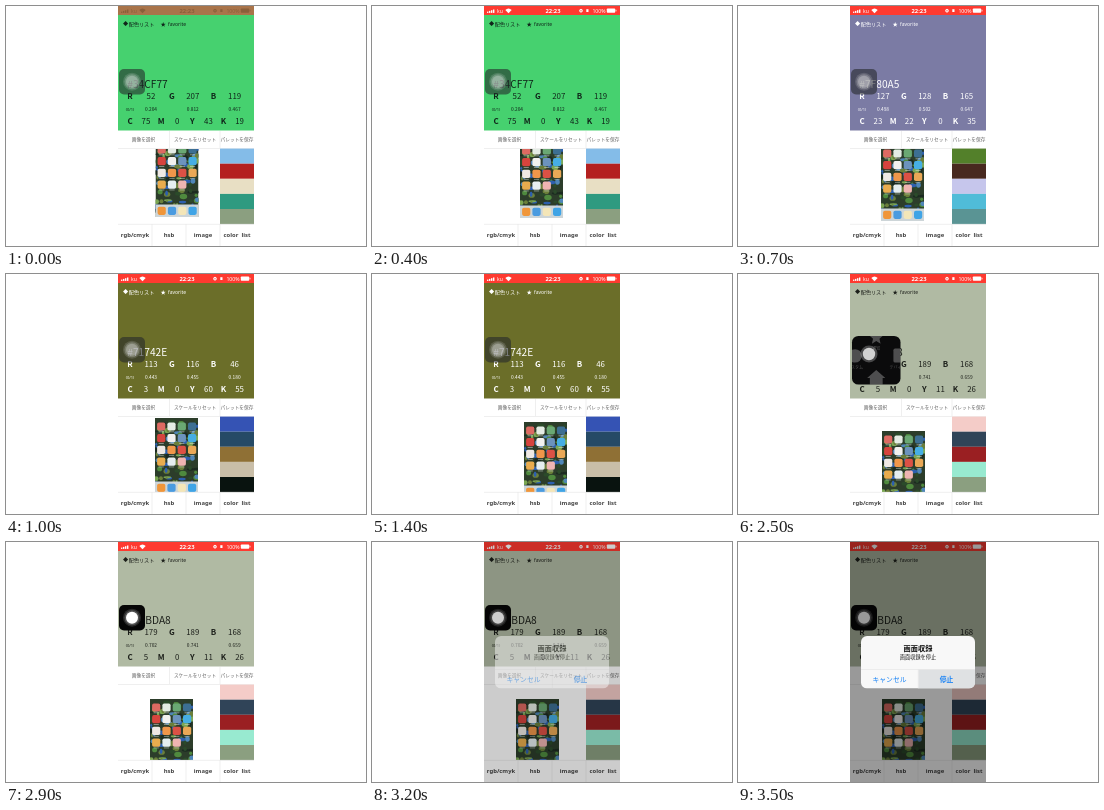
Write an HTML page that moves like this. It is 360 px wide and 240 px high and loops after 3800 ms.

```html
<!DOCTYPE html>
<html lang="ja">
<head>
<meta charset="utf-8">
<title>Color picker</title>
<style>
  html, body { margin: 0; width: 100%; height: 100%; overflow: hidden; background: #fff; }
  svg { display: block; width: 100vw; height: 100vh; }
  text { font-family: "Noto Sans", "Noto Sans CJK JP", sans-serif; text-anchor: middle; white-space: pre; }
  .left { text-anchor: start; }
  .bold { font-weight: 700; }
  .jp { font-family: "Noto Sans CJK JP", sans-serif; }
  .rule { stroke: #e4e4e4; stroke-width: .6; }
</style>
</head>
<body>
<svg id="stage" viewBox="0 0 360 240"></svg>
<script>
const LOOP = 3800;
const stage = document.getElementById("stage");
const $ = id => document.getElementById(id);

const text = (x, y, size, str, attrs = "") =>
  `<text x="${x}" y="${y}" font-size="${size}" ${attrs}>${str}</text>`;
const rect = (x, y, w, h, fill, attrs = "") =>
  `<rect x="${x}" y="${y}" width="${w}" height="${h}" fill="${fill}" ${attrs}/>`;
const circle = (x, y, r, fill, attrs = "") =>
  `<circle cx="${x}" cy="${y}" r="${r}" fill="${fill}" ${attrs}/>`;
const line = (x1, y1, x2, y2) =>
  `<line x1="${x1}" y1="${y1}" x2="${x2}" y2="${y2}" class="rule"/>`;

function seeded(seed) {
  return () => (seed = (seed * 16807) % 2147483647) / 2147483647;
}

function statusBar() {
  let dots = "";
  for (let i = 0; i < 4; i++) dots += rect(115 + i * 2, 5.6 - i * .7, 1.4, 1.3 + i * .7, "currentColor");
  return rect(112, 0, 136, 9, "#ff3a30", 'id="bar"') +
    `<g id="status" color="#fff" fill="currentColor">${dots}` +
    text(128, 6.8, 5, "ku") +
    `<path d="M133.3 4.1Q136.5 1 139.7 4.1L136.5 7.3Z"/>` +
    text(181, 7, 5.8, "22:23", 'class="bold"') +
    circle(209, 4.7, 1.4, "currentColor", 'stroke="currentColor" stroke-width=".9" fill-opacity=".5"') +
    rect(214.3, 3.2, 2.2, 2.8, "currentColor") +
    text(227, 6.8, 5.2, "100%") +
    rect(234.8, 2.5, 8.4, 4.2, "currentColor", 'rx=".8"') +
    rect(243.6, 3.8, .8, 1.6, "currentColor") + `</g>`;
}

function readout() {
  let out = text(117, 20, 5.2, "◆", 'class="left jp"') +
    text(122.8, 20, 5.1, "配色リスト", 'class="left jp"') +
    text(154.5, 20, 5.4, "★", 'class="left jp"') +
    text(162, 20, 5, "favorite", 'class="left"') +
    text(121.3, 82, 10.2, "", 'id="hex" class="left jp"') +
    text(124, 105, 4, "(0/1)");
  [..."RGB"].forEach((c, i) => {
    out += text(124 + i * 41.8, 93.4, 8, c, 'class="jp bold"') +
      text(145 + i * 41.8, 93.4, 7.9, "", `id="v${c}" class="jp"`) +
      text(145 + i * 41.8, 104.8, 4.8, "", `id="f${c}" class="jp"`);
  });
  [..."CMYK"].forEach((c, i) => {
    out += text(124 + i * 31.2, 118.2, 8, c, 'class="jp bold"') +
      text(140 + i * 31.2, 118.2, 7.9, "", `id="v${c}" class="jp"`);
  });
  return `<g id="readout">${out}</g>`;
}

// Home screen picture, 43 by 76, with plain tiles for the apps
function picture() {
  const rnd = seeded(41);
  const leaves = ["#2b4a2a", "#4f8a3e", "#2d5fae", "#7ba653", "#1b2a20", "#4f86b8", "#6b7f3a"];
  let out = rect(0, 0, 43, 76, "#2c3d2a");
  for (let i = 0; i < 90; i++) {
    const y = 4 + 66 * rnd();
    out += `<ellipse cx="${rnd() * 43}" cy="${y}" rx="${1 + rnd() * 3}" ry="${.8 + rnd() * 2}" fill="${leaves[i % 7]}"/>`;
  }
  const rows = [
    ["#dd6a62", "#e4ece4", "#6aa873", "#3d6f92"],
    ["#d6443d", "#f2f1ef", "#6c93bd", "#46aee4"],
    ["#efe9e4", "#f0964a", "#dc5145", "#eaa856"],
    ["#e9ac4e", "#e6eef0", "#efb4b2"]
  ];
  const tile = (x, y, c) => rect(x - 4.1, y - 4.1, 8.2, 8.2, c, 'rx="1.8"');
  rows.forEach((row, r) => row.forEach((c, i) => {
    const x = 6.2 + i * 10.3, y = 8.5 + r * 11.7;
    out += tile(x, y, c) + rect(x - 2.6, y + 5, 5.2, .7, "#dfe5e2", 'opacity=".7"');
  }));
  out += rect(0, 63.5, 43, 12.5, "#cdd5d8");
  ["#f0963a", "#4a9be0", "#f4e6b8", "#3fa4e6"].forEach((c, i) => out += tile(6.2 + i * 10.3, 69.8, c));
  return `<g clip-path="url(#frame)"><g id="picture"><g clip-path="url(#photo)">${out}</g></g></g>`;
}

function panel() {
  let bands = "";
  for (let i = 0; i < 5; i++) bands += rect(214, 142.6 + i * 15.1, 34, 15.1, "#fff", `id="band${i}"`);
  const tabs = ["rgb/cmyk", "hsb", "image", "color  list"];
  return rect(112, 124.5, 136, 115.5, "#fff") +
    `<g fill="#666">` +
    text(137.5, 135, 4.7, "画像を選択", 'class="jp"') +
    text(189, 135, 4.7, "スケールをリセット", 'class="jp"') +
    text(231, 135, 4.7, "パレットを保存", 'class="jp"') + `</g>` +
    line(163.5, 125, 163.5, 142) + line(214, 125, 214, 142) + line(112, 142.5, 248, 142.5) +
    picture() + bands + line(112, 218.3, 248, 218.3) +
    tabs.map((s, i) => text([129, 163, 197, 231][i], 231, 5.9, s, 'fill="#444" font-weight="600"')).join("") +
    [146, 180, 214].map(x => line(x, 218, x, 240)).join("");
}

function touchButton() {
  return `<g id="button">` + rect(113, 63, 26, 25.5, "#222", 'id="pad" rx="5"') +
    circle(126, 75.7, 9, "#fff", 'opacity=".14"') +
    circle(126, 75.7, 7.5, "#fff", 'opacity=".2"') +
    circle(126, 75.7, 6, "#fff", 'id="knob"') + `</g>`;
}

// Drawn in a 107 by 107 square, scaled as it opens
function touchMenu() {
  let star = "";
  for (let i = 0; i < 10; i++) {
    const a = i * Math.PI / 5, r = i % 2 ? 5 : 11;
    star += `${53.5 + r * Math.sin(a)},${20 - r * Math.cos(a)} `;
  }
  const labels = [[53.5, 39, "通知"], [22, 66, "カスタム"], [85, 66, "デバイス"], [53.5, 99, "ホーム"]];
  const icons = `<polygon points="${star}"/>` + circle(22, 47, 10, "#fff") +
    rect(79, 36, 12, 21, "#fff", 'rx="2.5"') +
    `<path d="M53.5 68L67 80H63V90H44V80H40Z"/>` +
    labels.map(([x, y, s]) => text(x, y, 6, s, 'class="jp"')).join("");
  return `<g id="menu">` + rect(0, 0, 107, 107, "#0b0b0c", 'rx="14"') +
    `<g clip-path="url(#tray)"><g id="icons" fill="#fff">${icons}</g></g></g>` +
    `<g id="glow">${circle(131, 80, 8.5, "#fff", 'opacity=".25"')}${circle(131, 80, 6.2, "#fff", 'opacity=".75"')}</g>`;
}

function dialog() {
  return rect(112, 0, 136, 240, "#000", 'id="dim"') +
    `<g id="alert" clip-path="url(#card)">` + rect(123, 94, 114, 52.5, "#f8f8f8") +
    rect(180.5, 127.5, 56.5, 19, "#dfe1e3", 'id="press"') +
    text(180, 108.8, 7.2, "画面収録", 'class="jp bold" fill="#111"') +
    text(180, 117.3, 5.2, "画面収録を停止", 'class="jp" fill="#222"') +
    line(123, 127.5, 237, 127.5) + line(180.3, 127.5, 180.3, 147) +
    text(151.5, 139.6, 6.8, "キャンセル", 'class="jp" fill="#1681f5"') +
    text(208.5, 139.6, 6.8, "停止", 'class="jp bold" fill="#1681f5"') + `</g>`;
}

stage.innerHTML = `<defs>
  <clipPath id="frame"><rect x="112" y="143" width="102" height="75"/></clipPath>
  <clipPath id="photo"><rect width="43" height="76"/></clipPath>
  <clipPath id="tray"><rect width="107" height="107" rx="14"/></clipPath>
  <clipPath id="card"><rect x="123" y="94" width="114" height="52.5" rx="6"/></clipPath>
  </defs>` + rect(0, 0, 360, 240, "#fff") + rect(112, 0, 136, 125, "#fff", 'id="swatch"') +
  statusBar() + readout() + panel() + touchButton() + touchMenu() + dialog();

const picks = {
  green: { rgb: [52, 207, 119], fill: "#46d16f", ink: "#10251a", bands: ["#84bce8", "#b4201f", "#e8dfc4", "#2f9a80", "#8b9f80"] },
  violet: { rgb: [127, 128, 165], fill: "#7b7ba4", ink: "#fff", bands: ["#53802a", "#48291f", "#c6c6ec", "#50bcd8", "#5a9494"] },
  olive: { rgb: [113, 116, 46], fill: "#6b6e29", ink: "#fff", bands: ["#3553b4", "#264a66", "#8f7035", "#c9bea8", "#09130f"] },
  sage: { rgb: [179, 189, 168], fill: "#b0baa3", ink: "#1c1f1a", bands: ["#f4ccc8", "#304458", "#9a1f22", "#98ead0", "#8b9f80"] }
};

// Each step keeps whatever it does not change
const steps = [
  [0, { pick: "green", at: [149.5, 135], faded: true, menu: null, lit: false, dim: 0, alert: 0, press: false }],
  [100, { faded: false }],
  [400, { at: [148, 136] }],
  [500, { at: [146.5, 137], pick: "violet" }],
  [600, { at: [144.5, 138] }],
  [700, { at: [143, 139] }],
  [900, { at: [146, 141] }],
  [1000, { at: [149, 144], pick: "olive" }],
  [1300, { at: [151, 147] }],
  [1400, { at: [152, 148] }],
  [2100, { at: [144, 157] }],
  [2200, { pick: "sage" }],
  [2500, { menu: [114, 62, 48.5, .28], lit: true }],
  [2600, { menu: [121, 64, 82, .65] }],
  [2700, { menu: [126.5, 66.5, 107, 1] }],
  [2900, { menu: null }],
  [3200, { dim: .2, alert: .5 }],
  [3300, { dim: .4, alert: 1 }],
  [3500, { press: true }]
];

const set = (id, attrs) => {
  for (const k in attrs) $(id).setAttribute(k, attrs[k]);
};
const show = (id, on) => set(id, { visibility: on ? "visible" : "hidden" });

function showPick({ rgb, fill, ink, bands }) {
  const top = Math.max(...rgb);
  const cmy = rgb.map(v => Math.round((1 - v / top) * 100));
  const cmyk = [...cmy, Math.round((1 - top / 255) * 100)];
  $("hex").textContent = "#" + rgb.map(v => v.toString(16).padStart(2, "0")).join("").toUpperCase();
  [..."RGB"].forEach((c, i) => {
    $("v" + c).textContent = rgb[i];
    $("f" + c).textContent = (rgb[i] / 255).toFixed(3);
  });
  [..."CMYK"].forEach((c, i) => $("v" + c).textContent = cmyk[i]);
  set("swatch", { fill });
  set("readout", { fill: ink });
  bands.forEach((color, i) => set("band" + i, { fill: color }));
}

function render(s) {
  showPick(picks[s.pick]);
  set("picture", { transform: `translate(${s.at})` });
  set("bar", { fill: s.faded ? "#a9744a" : "#ff3a30" });
  set("status", { color: s.faded ? "#8a5f3a" : "#fff" });
  set("pad", { fill: s.lit ? "#060606" : "#25282b", opacity: s.lit ? 1 : .6 });
  set("knob", { opacity: s.lit ? 1 : .25 });
  show("button", !s.menu);
  show("menu", s.menu);
  show("glow", s.menu && s.menu[3] < .5);
  if (s.menu) {
    const [x, y, size, shown] = s.menu;
    const zoom = Math.sqrt(107 / size);
    set("menu", { transform: `translate(${x} ${y}) scale(${size / 107})` });
    set("icons", { opacity: shown, transform: `translate(53.5 53.5) scale(${zoom}) translate(-53.5 -53.5)` });
  }
  set("dim", { opacity: s.dim });
  set("alert", { opacity: s.alert });
  set("press", { opacity: s.press ? 1 : 0 });
}

const start = performance.now();
let shown = -1;

function tick() {
  const t = (performance.now() - start) % LOOP;
  const count = steps.filter(([from]) => from <= t).length;
  if (count !== shown) {
    shown = count;
    render(Object.assign({}, ...steps.slice(0, count).map(([, change]) => change)));
  }
  requestAnimationFrame(tick);
}
tick();
</script>
</body>
</html>
```
